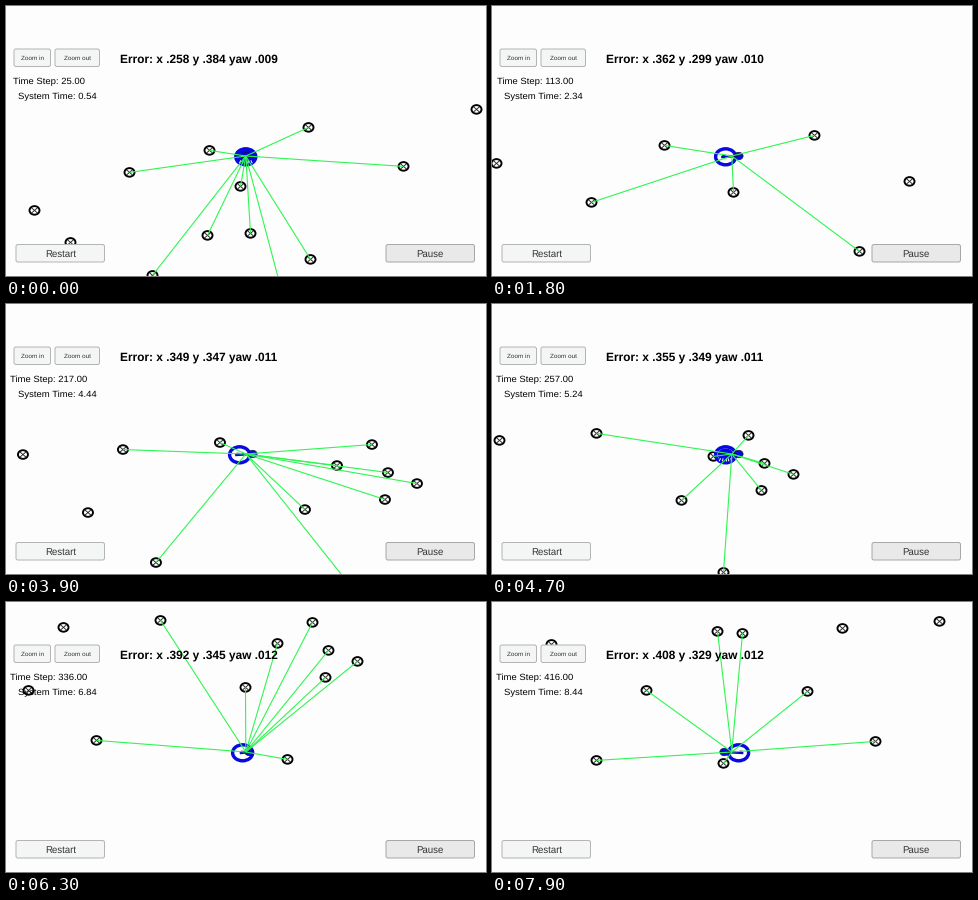
A matplotlib script for the animation above (8 s loop, 480 px wide and 270 px high).

```python
import numpy as np
import matplotlib.pyplot as plt
from matplotlib.animation import FuncAnimation
from matplotlib.collections import EllipseCollection, LineCollection
from matplotlib.patches import Ellipse, FancyBboxPatch

plt.rcParams["text.hinting"] = "no_hinting"

W, H, FRAMES, STEP_MS = 480, 270, 80, 100
PX = 0.72  # points per pixel at 100 dpi
CAR = np.array([239.8, 150.0])
RANGE = 169
BLUE, GREEN, INK = "#0808e0", "#2df650", "#101030"

# World map the car drives through
LANDMARKS = np.array([
    (-563, 259), (-527, 291), (-468, 221), (-445, 324), (-390, 284),
    (-388, 199), (-357, 235), (-347, 282), (-317, 335), (-287, 308),
    (-289, 176), (-194, 215), (-121, 158), (-52, 205),
    (29, 148), (74, 264), (124, 194), (195, 135), (220, 137), (201, 267),
    (285, 195), (320, 132), (353, 245), (417, 125), (502, 192), (534, 148),
    (544, 264), (569, 127), (582, 182), (585, 155), (614, 166)]) - (.5, .6)

# Waypoints of the scrolling world; speeds follow from them
TIMES = np.array([0, 1.8, 3.1, 3.6, 4.2, 4.7, 5.2, 5.6, 6.3, 7.0, 7.5, 7.9])
WAY = np.array([(592, -54), (294, -18), (0, 0), (-142, 9), (-250, 16),
                (-312, 5), (-349, -39), (-343, -81), (-262, -106),
                (-147, -111), (-53, -103), (31, -105)], float)
SPEED = np.gradient(WAY, TIMES, axis=0, edge_order=2)

ERR_T = [0, 1.8, 3.1, 4.7, 5.6, 7.0, 7.9]
ERR_X = [.258, .362, .343, .355, .369, .416, .408]
ERR_Y = [.384, .299, .346, .349, .353, .337, .329]


def smooth(t, a, b):
    u = np.clip((t - a) / (b - a), 0, 1)
    return u * u * (3 - 2 * u)


def camera(t):
    """Cubic Hermite position and velocity of the world."""
    i = int(np.clip(np.searchsorted(TIMES, t, "right") - 1, 0, len(TIMES) - 2))
    h = TIMES[i + 1] - TIMES[i]
    u = (t - TIMES[i]) / h
    p, q, m, n = WAY[i], WAY[i + 1], SPEED[i] * h, SPEED[i + 1] * h
    pos = (p * (2*u**3 - 3*u**2 + 1) + m * (u**3 - 2*u**2 + u)
           + q * (3*u**2 - 2*u**3) + n * (u**3 - u**2))
    vel = ((p - q) * (6*u**2 - 6*u) + m * (3*u**2 - 4*u + 1)
           + n * (3*u**2 - 2*u)) / h
    return pos, vel


def label(x, y, text="", size=9.45, ha="center", color="black", **kw):
    return ax.text(x, y, text, fontsize=size * PX, ha=ha, va="baseline",
                   family="Liberation Sans", color=color, zorder=9, **kw)


def button(x0, y0, x1, y1, text, size, face="#f3f6f5", edge="#b4b4b4"):
    ax.add_patch(FancyBboxPatch(
        (x0, y0), x1 - x0, y1 - y0, boxstyle="round,pad=0,rounding_size=2",
        fc=face, ec=edge, lw=PX, zorder=8))
    label((x0 + x1) / 2, (y0 + y1) / 2 + size * .34, text, size, color="#333333")


fig = plt.figure(figsize=(W / 100, H / 100), dpi=100, facecolor="#fdfdfd")
ax = fig.add_axes([0, 0, 1, 1])
ax.set(xlim=(0, W), ylim=(H, 0))
ax.axis("off")

button(8, 43, 44.5, 60.5, "Zoom in", 6.4)
button(49, 43, 93.5, 60.5, "Zoom out", 6.4)
button(10, 238.5, 98.5, 256, "Restart", 9.6)
button(380, 238.5, 468.5, 256, "Pause", 9.6, "#e9e9e9", "#a8a8a8")
error = label(114, 56.6, size=11.85, ha="left", weight="bold")
step = label(43, 77.7)
clock = label(51, 92.7)

n = len(LANDMARKS)
rings = EllipseCollection([10] * n, [8.6] * n, [0] * n, units="xy",
                          offsets=LANDMARKS, transOffset=ax.transData,
                          facecolors="white", edgecolors="black",
                          linewidths=1.9 * PX, zorder=2)
crosses = LineCollection([], colors="#222222", linewidths=.9 * PX, zorder=3)
beams = LineCollection([], colors=GREEN, linewidths=1.1 * PX, zorder=6)
ticks = LineCollection([], colors="white", linewidths=.9 * PX, zorder=4.5)
for c in (rings, crosses, beams, ticks):
    ax.add_collection(c)

belief = ax.add_patch(Ellipse((0, 0), 20, 16, fc="white", ec=BLUE,
                              lw=3.4 * PX, zorder=4))
core = ax.add_patch(Ellipse((0, 0), 1, 1, fc=BLUE, ec="none", zorder=4.1))
nose = ax.add_patch(Ellipse((0, 0), 9, 7.5, fc=BLUE, ec=INK,
                            lw=.6 * PX, zorder=4.3))
body, = ax.plot([], [], color=BLUE, lw=2.4 * PX, zorder=4.2)
detail, = ax.plot([], [], color=INK, lw=1.6 * PX, ls=(0, (2, 1.6)), zorder=4.4)

DIAG = np.array([[(-3, -2.6), (3, 2.6)], [(-3, 2.6), (3, -2.6)]])


def draw_car(t):
    # The belief ring trails the car and swaps sides after the U-turn
    lag = -6.2 * smooth(t, 0, 1) + 13 * smooth(t, 5.8, 7.4)
    ring, tip = CAR + (lag, .8), CAR - (lag * 1.1, 0)
    fill = max(0, 1 - t, .8 - abs(t - 4.7))
    belief.center = core.center = ring
    core.width, core.height = 20 * fill, 16 * fill
    nose.center = tip
    tail = ring + (ring - tip) * .25
    body.set_data(*zip(tail, tip))
    detail.set_data(*zip(tail - (0, 1.5), tip))
    ticks.set_segments([[ring + (x, 3.5), ring + (x * 1.3, 6.5)]
                        for x in np.linspace(-5, 5, 5)] if fill > .5 else [])


def short(v):
    return f"{v:.3f}"[1:]


def update(i):
    t = i * STEP_MS / 1000
    pos, vel = camera(t)
    pts = LANDMARKS + pos
    rings.set_offsets(pts)
    crosses.set_segments([p + d for p in pts for d in DIAG])
    ahead = CAR - vel * .045
    near = np.hypot(*(pts - ahead).T) < RANGE
    beams.set_segments([[CAR, p] for p in pts[near]])
    draw_car(t)
    ex, ey = np.interp(t, ERR_T, ERR_X), np.interp(t, ERR_T, ERR_Y)
    error.set_text(f"Error: x {short(ex)} y {short(ey)}"
                   f" yaw {short(.0094 + .00036 * t)}")
    step.set_text(f"Time Step: {int(25 + 49.3 * t + .025 * t * t)}.00")
    clock.set_text(f"System Time: {t + .54:.2f}")
    return rings, crosses, beams, error, step, clock


anim = FuncAnimation(fig, update, frames=FRAMES, interval=STEP_MS,
                     repeat=True, repeat_delay=0, blit=False)
plt.show()
```
